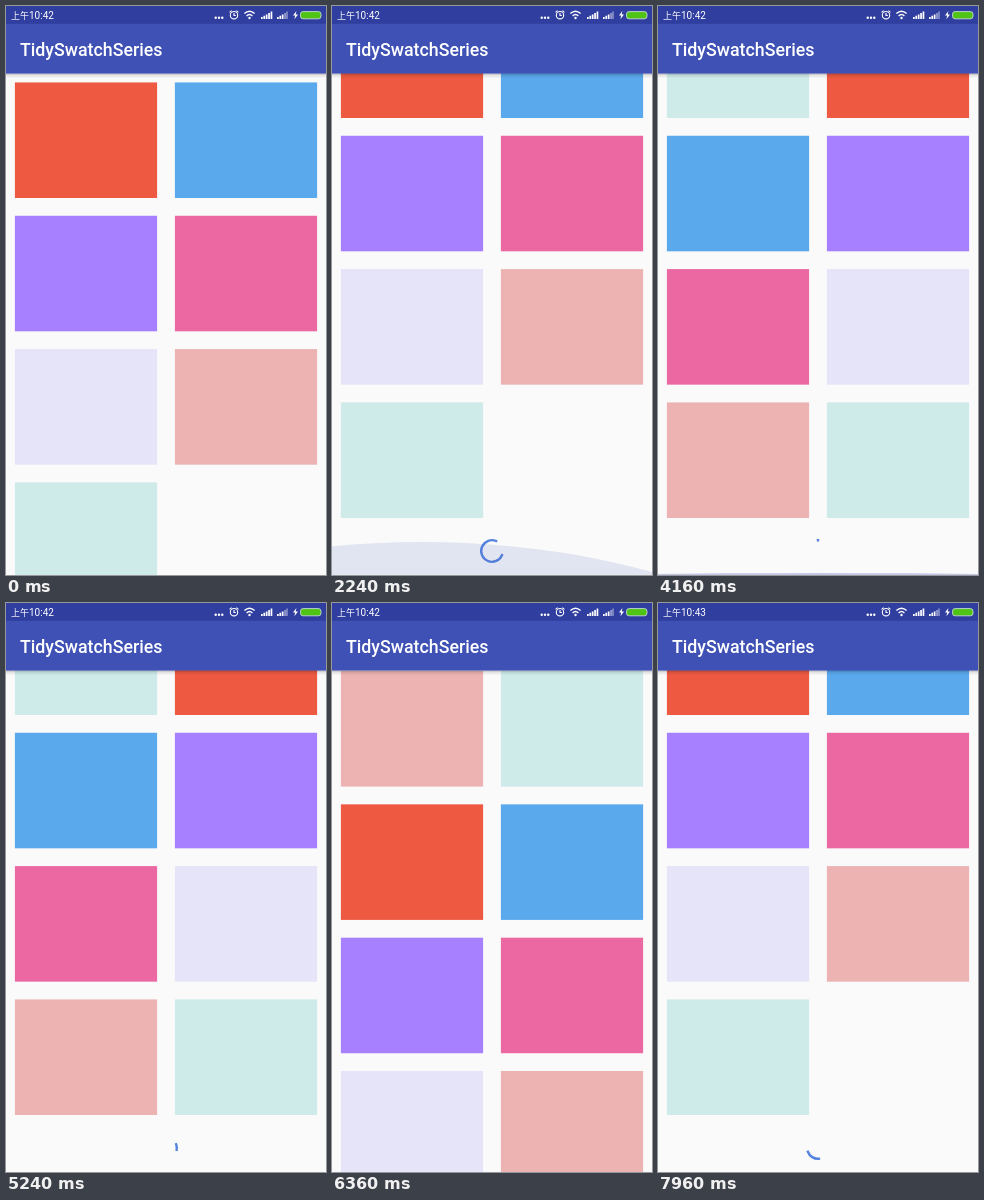
Recreate the animation shown at these times as an HTML page. Size 320 px wide and 569 px high, loop 8000 ms.

```html
<!DOCTYPE html>
<html lang="zh">
<head>
<meta charset="utf-8">
<title>Endless grid</title>
<style>
  html, body { margin: 0; width: 100%; height: 100%; overflow: hidden; background: #fafafa; }
  svg { display: block; width: 100vw; height: 100vh; }
  text { fill: #fff; font-family: Roboto, "Noto Sans CJK SC", "Noto Sans CJK", sans-serif; }
</style>
</head>
<body>
<svg viewBox="0 0 320 569">
  <defs>
    <linearGradient id="shade" x2="0" y2="1">
      <stop stop-color="#000" stop-opacity=".26"/>
      <stop offset=".4" stop-color="#000" stop-opacity=".09"/>
      <stop offset="1" stop-color="#000" stop-opacity="0"/>
    </linearGradient>
  </defs>
  <rect width="320" height="569" fill="#fafafa"/>
  <g id="list">
    <circle id="spinner" r="10.8" pathLength="360" fill="none" stroke="#5584de" stroke-width="2.4" stroke-linecap="square"/>
  </g>
  <ellipse id="glow" rx="480" fill="#3f51b5"/>

  <rect y="67.5" width="320" height="5" fill="url(#shade)"/>
  <rect width="320" height="67.6" fill="#3f51b5"/>
  <rect width="320" height="17.8" fill="#303f9f"/>
  <text x="14" y="49.6" font-size="17.78" font-weight="500">TidySwatchSeries</text>

  <text x="5" y="12.7" font-size="9">上午</text>
  <text id="clock" x="23" y="12.9" font-size="10"></text>
  <g fill="#fff">
    <circle cx="209.7" cy="11.7" r="1.2"/>
    <circle cx="213" cy="11.7" r="1.2"/>
    <circle cx="216.3" cy="11.7" r="1.2"/>
    <path d="M255 13v-2h1.7v2zM257.4 13v-3.2h1.7v3.2zM259.8 13v-4.6h1.7v4.6zM262.2 13v-6h1.7v6zM264.6 13v-7.4h1.7v7.4z"/>
    <path d="M271 13v-2h1.7v2zM273.4 13v-3.2h1.7v3.2zM275.8 13v-4.6h1.7v4.6z"/>
    <path d="M278.2 13v-6h1.7v6zM280.3 13v-7.4h1.4v7.4z" opacity=".5"/>
    <path d="M290.4 5l-3.4 4.6h2.2l-.8 3.6 3.6-4.8h-2.3z"/>
    <circle cx="243.5" cy="12" r="1.2"/>
  </g>
  <g fill="none" stroke="#fff" stroke-width="1.1">
    <circle cx="228" cy="9.2" r="3.7"/>
    <path d="M228 7v2.5h1.8M223.6 6.4l2-1.8M232.4 6.4l-2-1.8"/>
    <path d="M240.6 9.9q2.9-2.6 5.8 0M238.4 7.6q5.1-4.6 10.2 0" stroke-width="1.4"/>
    <rect x="294.5" y="5.6" width="20.5" height="7.2" rx="2.6" fill="#4fc414" stroke="#c8d8d8" stroke-width=".9"/>
  </g>
</svg>
<script>
const LOOP = 8000, STEP = 40, PITCH = 133.33;
const COLORS = ['#ee5a41', '#5aa9ed', '#a780ff', '#eb68a3', '#e6e4f8', '#ecb3b2', '#ceebea'];

// One page of seven cells per load
const LOADS = [
  { until: 3120, spin: 1600 },
  { until: 5680, spin: 4160 },
  { until: LOOP, spin: 6450 }
];

const SCROLL = [
  [1400, 0], [1440, 4], [1600, 36], [1720, 80],
  [3960, 80], [4000, 105.8], [4040, 212], [4120, 430], [4160, 480],
  [6240, 480], [6280, 520], [6320, 660], [6360, 808.4], [6400, 930], [6440, 1013.3]
];

const GLOWS = [
  { start: 1720, peak: 2070, end: 2670, x: 90, from: 0, to: .26 },
  { start: 4160, peak: 4360, end: 4860, x: 160, from: .3, to: .5 },
  { start: 6440, peak: 6640, end: 7140, x: 160, from: .3, to: .5 }
];

const $ = id => document.getElementById(id);
const list = $('list'), spinner = $('spinner'), glow = $('glow'), clock = $('clock');
const clamp = x => Math.min(1, Math.max(0, x));
const mix = (a, b, k) => a + (b - a) * k;
const decelerate = x => 1 - (1 - x) ** 2;

function set(el, attrs) {
  for (const key in attrs) el.setAttribute(key, attrs[key]);
}

// cubic-bezier(.4, 0, .2, 1)
function ease(x) {
  let lo = 0, hi = 1;
  for (let i = 0; i < 20; i++) {
    const u = (lo + hi) / 2, v = 1 - u;
    if (1.2 * v * v * u + .6 * v * u * u + u ** 3 < x) lo = u; else hi = u;
  }
  return lo * lo * (3 - 2 * lo);
}

const cells = Array.from({ length: 21 }, (_, i) => {
  const cell = document.createElementNS('http://www.w3.org/2000/svg', 'rect');
  set(cell, {
    x: i % 2 ? 168.9 : 8.9, y: 76.44 + (i >> 1) * PITCH,
    width: 142.2, height: 115.56, fill: COLORS[i % 7]
  });
  return list.appendChild(cell);
});

function scrollAt(t) {
  const i = SCROLL.findIndex(key => key[0] > t);
  if (i === 0) return 0;
  if (i < 0) return SCROLL[SCROLL.length - 1][1];
  const [t0, y0] = SCROLL[i - 1], [t1, y1] = SCROLL[i];
  return mix(y0, y1, (t - t0) / (t1 - t0));
}

function drawSpinner(age, y) {
  const phase = age / 1333 % 1;
  const tail = .75 * ease(clamp(phase * 2 - 1));
  const head = .75 * ease(clamp(phase * 2));
  const turn = (tail + phase / 4) * 360 + age * .108 - 90;
  set(spinner, {
    'stroke-dasharray': `${Math.max(.01, (head - tail) * 360)} 360`,
    transform: `translate(160 ${y}) rotate(${turn})`
  });
}

function drawGlow(t) {
  const g = GLOWS.find(g => t >= g.start && t < g.end);
  glow.style.display = g ? '' : 'none';
  if (!g) return;
  const grow = decelerate(clamp((t - g.start) / (g.peak - g.start)));
  const left = 1 - decelerate(clamp((t - g.peak) / (g.end - g.peak)));
  const size = mix(.03, 1, grow) * left;
  set(glow, {
    cx: g.x, cy: 569 + (480 - 64.3) * size, ry: 480 * size,
    opacity: mix(g.from, g.to, grow) * left
  });
}

function draw(now) {
  const t = Math.floor(now % LOOP / STEP) * STEP;
  const page = LOADS.findIndex(load => t < load.until);
  const count = 7 * (page + 1);
  cells.forEach((cell, i) => cell.style.display = i < count ? '' : 'none');
  set(list, { transform: `translate(0 ${-scrollAt(t)})` });
  drawSpinner(Math.max(0, t - LOADS[page].spin), 625 + (Math.ceil(count / 2) - 4) * PITCH);
  drawGlow(t);
  clock.textContent = t < 7000 ? '10:42' : '10:43';
}

const begin = performance.now();
function tick() {
  draw(performance.now() - begin);
  requestAnimationFrame(tick);
}
tick();
</script>
</body>
</html>
```
